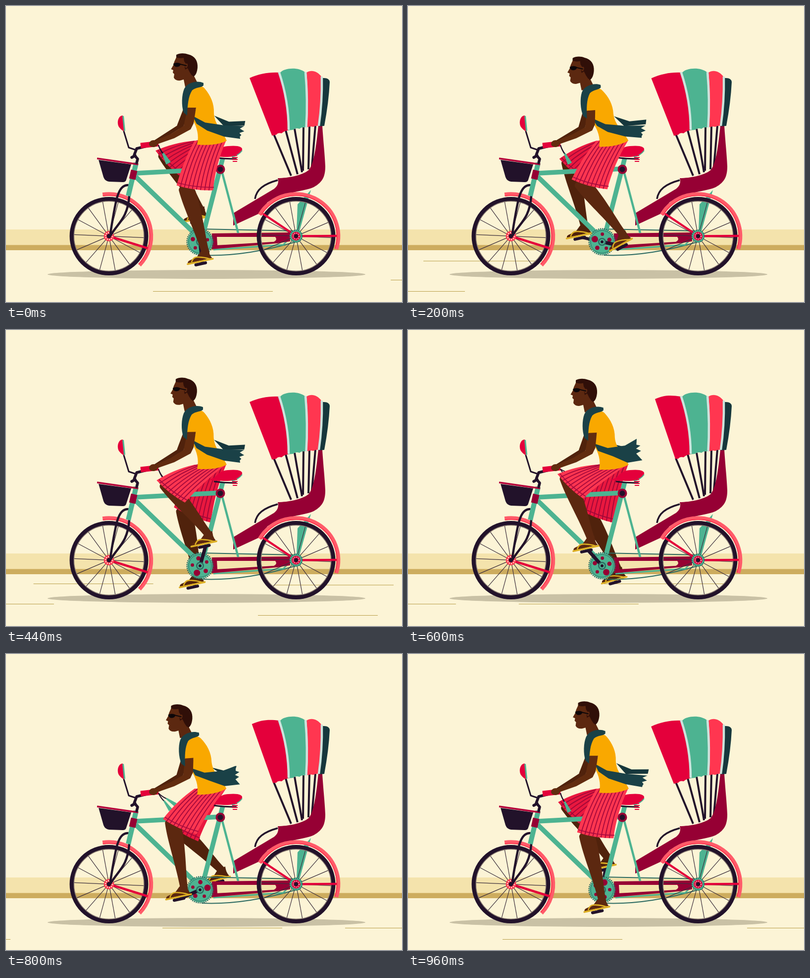
Recreate the animation shown at these times as an HTML page with a canvas. Size 800x600 px, loop 1 s.

```html
<!DOCTYPE html>
<html lang="en">
<head>
<meta charset="utf-8">
<title>Cycle rickshaw</title>
<style>
html, body { margin: 0; width: 100%; height: 100%; overflow: hidden; background: #fcf4d6; }
canvas { display: block; width: 800px; height: 600px; }
</style>
</head>
<body>
<canvas id="stage" width="800" height="600"></canvas>
<script>
const ctx = document.getElementById('stage').getContext('2d');
const TAU = Math.PI * 2, DEG = Math.PI / 180;
const LOOP = 1000, STEP = 40;
const C = {
  bg: '#fcf4d6', wall: '#f4e3ac', kerb: '#cdac5e', shade: '#c9c1a5', dash: '#b9a04b',
  ink: '#22122a', red: '#e4003b', pink: '#ff3650', rose: '#ff5b69', wine: '#960034',
  teal: '#4db391', pale: '#cbe3dc', sea: '#1a4147', deep: '#16373c', chain: '#2c6b62',
  skin: '#5c2810', skinFar: '#50220c', arm: '#622c0f', hair: '#300f08', gold: '#f9a800', strap: '#dcae23'
};
const CRANK = [392, 478], HIP = [425, 285], WAIST = [420, 280];
const THIGH = 104, SHIN = 137;

const lerp = (a, b, k) => a + (b - a) * k;
const mix = (p, q, k) => [lerp(p[0], q[0], k), lerp(p[1], q[1], k)];
const add = (p, x, y) => [p[0] + x, p[1] + y];
const polar = (p, r, a) => [p[0] + r * Math.cos(a), p[1] + r * Math.sin(a)];
const quad = (a, b, c, k) => mix(mix(a, b, k), mix(b, c, k), k);
const wave = (t, period, peak) => (1 + Math.cos(TAU * (t - peak) / period)) / 2;

function fill(d, color) {
  ctx.fillStyle = color;
  ctx.fill(new Path2D(d), 'evenodd');
}
function stroke(d, color, w, cap = 'butt') {
  ctx.strokeStyle = color;
  ctx.lineWidth = w;
  ctx.lineCap = cap;
  ctx.lineJoin = 'round';
  ctx.stroke(new Path2D(d));
}
const line = (p, q, color, w, cap) => stroke(`M${p}L${q}`, color, w, cap);
const poly = (pts, color) => fill('M' + pts.join('L') + 'Z', color);
function oval(p, rx, ry, tilt, color) {
  ctx.fillStyle = color;
  ctx.beginPath();
  ctx.ellipse(p[0], p[1], rx, ry, tilt, 0, TAU);
  ctx.fill();
}
const disc = (p, r, color) => oval(p, r, r, 0, color);
function arc(p, r, a, b, color, w, dash = []) {
  ctx.strokeStyle = color;
  ctx.lineWidth = w;
  ctx.lineCap = 'butt';
  ctx.setLineDash(dash);
  ctx.beginPath();
  ctx.arc(p[0], p[1], r, a, b);
  ctx.stroke();
  ctx.setLineDash([]);
}
function at(p, angle, draw) {
  ctx.save();
  ctx.translate(p[0], p[1]);
  ctx.rotate(angle);
  draw();
  ctx.restore();
}

// y, px per ms, time at which the line enters from the left
const DASHES = [[578.5, 2.65, 796.6], [578.5, 2.65, 156.6], [517, 2.125, 71.5],
  [514.5, 2.125, 300], [555.5, 2.306, 398], [555.5, 2.306, 558]];

function ground(t) {
  ctx.fillStyle = C.bg;
  ctx.fillRect(0, 0, 800, 600);
  ctx.fillStyle = C.wall;
  ctx.fillRect(0, 453, 800, 32);
  ctx.fillStyle = C.kerb;
  ctx.fillRect(0, 484.5, 800, 10.5);
  oval([405, 544], 321, 9, 0, C.shade);
  for (const [y, v, enter] of DASHES) {
    const x = v * ((t - enter + LOOP) % LOOP);
    line([x - 242, y], [x, y], C.dash, 1.1);
  }
}

function wheel(c, spin) {
  for (let i = 0; i < 14; i++) {
    const a = spin + Math.PI + i * TAU / 14;
    line(polar(c, 8, a), polar(c, 72, a), '#3d2f3c', 1.2);
  }
  arc(c, 71, 0, TAU, '#8a7c72', 2);
  arc(c, 75.5, 0, TAU, C.ink, 8);
}
function fender(c, a, b) {
  arc(c, 85.5, a * DEG, b * DEG, C.rose, 7.5);
  arc(c, 82.5, a * DEG, b * DEG, C.pink, 2);
}

function canopy(s) {
  stroke('M541 260L576 344M565 252L589 341M583 249L598 337M601 246L600 334M613 244L611 331M625 243L618 325', C.ink, 4);
  fill('M631 243L639 243C641 275 644 300 645 325C645 345 640 357 622 367C605 376 560 376 528 398L515 419L459 445V420L541 371Q553 362 549 349C570 349 600 343 612 332C624 316 628 270 631 243Z', C.wine);
  const x = 491 + 8 * s, y = 147 - 7 * s, bx = 537 + 3 * s, by = 263 - 2 * s;
  fill(`M${x} ${y}C${x + 20} ${y - 9} 532 ${134 - 2 * s} 552 135C563 165 572 210 570 252Q562 253 557 258Q549 256 546 261L${bx} ${by}Z`, C.red);
  fill('M554 135C562 125 592 123 605 135C609 170 608 215 605 246Q597 245 593 249Q585 246 580 251L570 252C572 210 564 165 554 135Z', C.teal);
  fill('M607 135C616 129 628 131 637 143C638 180 635 215 632 243Q625 242 621 245Q615 243 608 246C611 210 610 165 607 135Z', C.pink);
  fill('M640 146Q653 145 654 154Q652 195 643 243L632 244Q639 200 640 146Z', C.deep);
  stroke('M551.5 134Q571 192 571 251M605 134Q610 190 606.5 246M638 143Q639 195 632 243', C.pale, 4.5);
}

function crank(th, w) {
  const p = [CRANK[0] + 41 * Math.sin(th), CRANK[1] + 41 * Math.cos(th)];
  line(CRANK, p, C.ink, w, 'round');
}

function pose(th) {
  const sole = [CRANK[0] - 4 + 43 * Math.sin(th), CRANK[1] - 3 + 43 * Math.cos(th)];
  const tilt = -(12 + 17 * Math.max(0, Math.cos(th - 1.35)) ** 8) * DEG;
  const ankle = polar(sole, 19.8, tilt - Math.PI / 4);
  const dx = HIP[0] - ankle[0], dy = ankle[1] - HIP[1], d = Math.hypot(dx, dy);
  const bend = Math.acos((THIGH ** 2 + d * d - SHIN ** 2) / (2 * THIGH * d));
  const lift = Math.atan2(dx, dy) + bend;
  const knee = [HIP[0] - THIGH * Math.sin(lift), HIP[1] + THIGH * Math.cos(lift)];
  return { sole, tilt, ankle, knee, lift };
}

function leg(p, color) {
  at(p.sole, p.tilt, () => {
    stroke('M-10 5H10', C.ink, 6, 'round');
    fill('M-25 -1Q-26 -6 -18 -7L-5 -10L6 -20L22 -22Q20 -10 25 -2Z', color);
    stroke('M-26 0H26', C.strap, 3.5, 'round');
    stroke('M-17 -3Q-12 -11 -5 -10Q8 -8 20 -1', C.strap, 2.6, 'round');
  });
  const a = Math.atan2(p.ankle[1] - p.knee[1], p.ankle[0] - p.knee[0]) - Math.PI / 2;
  at(p.knee, a, () => fill('M-16 0C-17 40 -8 85 -7 139L8 139C8 108 17 68 16 10C14 -10 -15 -12 -16 0Z', color));
}

function skirt(p, far) {
  const flex = p.lift - 0.55;
  const tilt = far ? 0.33 + flex * 0.72 : flex * 1.05;
  const a = [381, 273], b = [445, 272];
  const f = add(p.knee, -20, -6), g = polar(p.knee, far ? 60 : 54, tilt);
  const hem = add(mix(f, g, 0.5), -2, 6);
  const front = add(mix(f, a, 0.5), -4, -6), back = add(mix(g, b, 0.5), -9, 1);
  const dark = far ? '#a10838' : '#a90b3d';
  fill(`M${a}Q${front} ${f}Q${hem} ${g}Q${back} ${b}Z`, far ? '#e9183f' : C.pink);
  for (let i = 1; i < 9; i++) {
    const k = i / 9;
    stroke(`M${mix(a, b, k)}Q${mix(front, back, k)} ${quad(f, hem, g, k)}`, dark, 2);
  }
  const waist = mix(a, b, 0.5);
  stroke(`M${mix(f, a, 0.06)}Q${mix(hem, waist, 0.06)} ${mix(g, b, 0.06)}`, dark, 1.8);
}

function frame() {
  stroke('M246 363C226 364 222 390 211 460M249 385C246 430 226 440 212 464', C.ink, 4.5, 'round');
  stroke('M436 335L469 460', C.teal, 4.5);
  stroke('M262 339L432 330M262 346L386 466M438 308L399 460', C.teal, 9.5);
  stroke('M263 318L247 385', C.teal, 10);
  stroke('M259 333L255 351', C.wine, 13);
  // saddle
  fill('M406 304C428 302 424 286 448 284C468 282 479 285 477 292C472 301 462 307 440 306Z', C.red);
  stroke('M477 293Q470 303 456 306', C.teal, 2);
  stroke('M420 307Q440 310 466 310', C.ink, 3);
  stroke('M457 303H467M457 307H468M457 311H468M458 315H467', C.red, 2);
  disc([433, 331], 9.5, C.wine);
  disc([433, 331], 5.5, C.ink);
}

function drive() {
  stroke('M395 452L586 456M395 505Q480 509 586 478', C.chain, 2);
  stroke('M419 494L560 484L572 472', C.teal, 3);
  fill('M416 461L574 459V477L548 481L416 493ZM426 468L427 485L541 478Q549 474 544 468Z', C.wine);
}

function gear(th) {
  disc(CRANK, 25.5, C.teal);
  arc(CRANK, 26.5, 0, TAU, C.chain, 2.5, [2.2, 1.8]);
  arc(CRANK, 23, 0, TAU, C.chain, 1);
  for (let i = 0; i < 5; i++) {
    const a = Math.PI / 2 - th - 3 - i * TAU / 5;
    disc(polar(CRANK, 15.5, a), i ? 3.4 + i % 2 : 6.5, C.wine);
  }
}

function hub() {
  disc(CRANK, 8, C.chain);
  disc(CRANK, 5.5, C.teal);
  disc(CRANK, 3, C.ink);
}

function bars() {
  fill('M187 312L253 321L243 352Q242 357 236 357L208 356Q200 355 197 347Z', C.ink);
  stroke('M184 309L267 321', '#b4003a', 3.5);
  stroke('M288 283L264 289L259 302L266 310L264 318M261 303L254 307', C.ink, 5.5, 'round');
  stroke('M263 292L248 287L238 254', C.ink, 3, 'round');
  fill('M236 222C227 222 223 236 228 245Q233 252 239 254Z', C.red);
  stroke('M236.5 223L239.5 253', C.teal, 3);
  stroke('M272 283L308 279', C.red, 11);
}

function tassels(s) {
  for (const a of [lerp(65, 50, s), lerp(65, 22, s)]) {
    at([308, 282], a * DEG, () => {
      stroke('M0 0Q10 2 21 0', C.ink, 2);
      fill('M19 -1.5L42 -4L42 4L19 1.5Z', C.teal);
    });
  }
}

function head() {
  fill('M345 102L340 113L338 120L333.5 128L338 130L337 135L340 138L339 145Q342 152 352 151L359 149L362 164L390 162L379 140L384 115L370 101Z', C.skin);
  fill('M344 99C350 95 361 95 368 98C382 101 388 112 387 125C386 134 384 140 379 143L375 140L371 134L367 126L362 129L361 123L364 118L360 112L359 105Q350 107 344 104Z', C.hair);
  oval([364.5, 121], 2.5, 4.5, 0.2, C.skin);
  fill('M338 117Q346 113 353 117Q352 123.500 345 123.500Q339 123 338 117Z', '#0d0709');
  stroke('M352 118L365 121', '#0d0709', 2);
}

const BAND = [[377, 222], [402, 236], [440, 243], [484, 247], [474, 251], [483, 257], [473, 260], [476, 264], [474, 267], [473, 270], [440, 264], [405, 252], [385, 238]];
const BAND_UP = [[378, 228], [405, 238], [440, 234], [464, 221], [463, 233], [471, 235], [462, 241], [472, 246], [462, 251], [474, 265], [444, 269], [415, 255], [385, 243]];
const TAIL = [[421, 221], [452, 234], [487, 234], [485, 243], [440, 243]];
const TAIL_UP = [[418, 231], [440, 237], [460, 226], [460, 240], [440, 245]];
const blend = (p, q, k) => p.map((v, i) => mix(v, q[i], k));

function rider(lean, s) {
  const angle = -4.9 * DEG * lean, drop = 2 * lean;
  const turn = ([x, y]) => {
    const r = Math.hypot(x - WAIST[0], y - WAIST[1]);
    return add(polar(WAIST, r, Math.atan2(y - WAIST[1], x - WAIST[0]) + angle), 0, drop);
  };
  const half = p => mix(p, turn(p), 0.4);
  const torso = draw => at(add(WAIST, 0, drop), angle, () => {
    ctx.translate(-WAIST[0], -WAIST[1]);
    draw();
  });

  const farElbow = half([352, 243]);
  stroke(`M${turn([364, 212])}L${farElbow}`, C.skinFar, 13, 'round');
  stroke(`M${farElbow}L298 278`, C.skinFar, 8, 'round');

  // the head leans with the torso but stays upright
  const neck = [365, 135];
  at(add(turn(neck), -neck[0], -neck[1]), 0, head);

  torso(() => {
    poly(blend(TAIL, TAIL_UP, s), C.deep);
    fill('M372 166C385 160 397 161 402 168C413 181 421 198 420 217C421 240 438 255 446 273C430 281 410 283 386 281C391 262 385 245 378 232L384 207L366 207C366 190 368 174 372 166Z', C.gold);
    poly(blend(BAND, BAND_UP, s), C.sea);
  });
  poly([turn([367, 206]), turn([384, 206]), half([379, 238]), half([373, 250]),
    [340, 268], [303, 281], [299, 274], [334, 259], half([359, 243])], C.arm);
  oval([298, 279], 9, 7, -0.1, C.arm);
  torso(() => fill('M399 156C386 150 366 155 360 168C355 180 354 202 359 216L366 222C367 200 368 184 376 171C384 164 395 166 399 161Z', C.sea));
}

function draw(t) {
  const th = TAU * t / LOOP + 0.1;
  const near = pose(th), far = pose(th + Math.PI);
  const gust = wave(t, 250, 95), lean = 1 - wave(t, 500, -10);
  const spin = 2.5 * DEG;
  const front = [208, 466.5], rear = [586, 466.5];

  ground(t);
  crank(th + Math.PI, 6);
  leg(far, C.skinFar);
  skirt(far, true);

  stroke('M503 391C506 372 520 361 549 353', C.ink, 3.5);
  fill('M589 402L616 373L593 456H587Z', C.teal);
  canopy(gust);
  drive();
  wheel(rear, spin);
  fender(rear, -149.5, 18);
  line([519, 421], [580, 462], C.red, 4.5);
  line(rear, [668, 466], C.red, 4.5);
  disc(rear, 13, C.teal);
  arc(rear, 12, 0, TAU, C.chain, 2.5, [2, 2]);
  disc(rear, 9, C.red);
  arc(rear, 6, 0, TAU, C.pale, 2, [1.5, 2.5]);
  disc(rear, 4, C.ink);

  wheel(front, spin);
  fender(front, -98.6, 43.6);
  line(front, [286, 491], C.red, 4.5);
  disc(front, 10.5, C.pink);
  arc(front, 7, 0, TAU, C.bg, 2.5, [2, 2.4]);
  disc(front, 4.5, C.ink);

  frame();
  gear(th);
  crank(th, 7);
  hub();
  bars();
  tassels(gust);
  leg(near, C.skin);
  skirt(near, false);
  rider(lean, gust);
}

function tick() {
  draw(Math.floor(performance.now() % LOOP / STEP) * STEP);
  requestAnimationFrame(tick);
}
tick();
</script>
</body>
</html>
```
